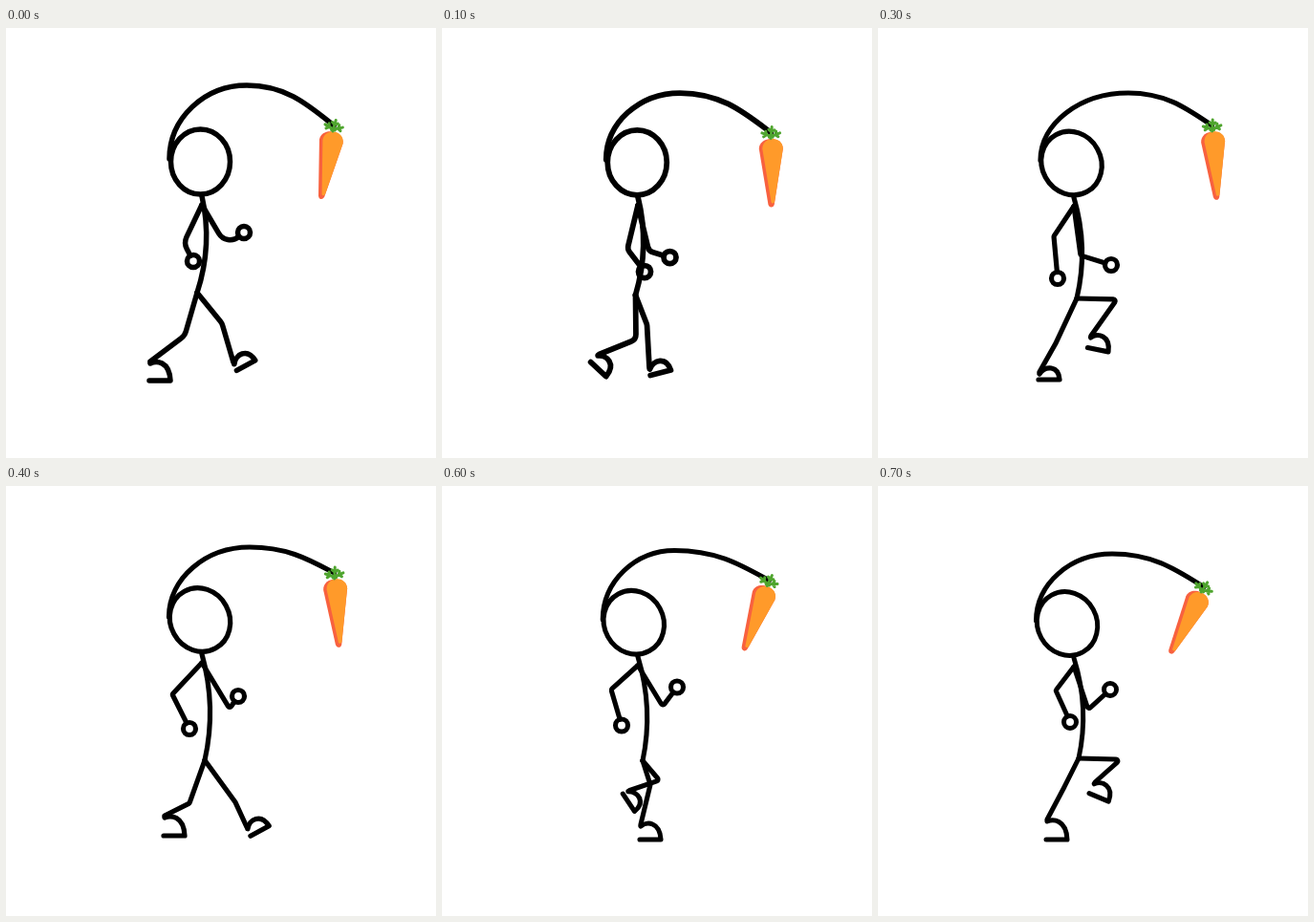
Recreate the animation shown at these times as an HTML page with a canvas. Size 450 px wide and 450 px high, loop 0.8 s.

```html
<!DOCTYPE html>
<html lang="en">
<head>
<meta charset="utf-8">
<title>Carrot walk</title>
<style>
html, body { margin: 0; width: 100%; height: 100%; overflow: hidden; background: #fff; }
canvas { display: block; width: 450px; height: 450px; }
</style>
</head>
<body>
<canvas id="stage" width="450" height="450"></canvas>
<script>
const ctx = document.getElementById('stage').getContext('2d');
const STEP = 100, STEPS = 8, HAND = 6.5;

// Key poses. Arms: elbow, hand. Legs: knee, ankle, [foot angle, foot depth].
const keys = [
  { at: 0, pen: 5.5, soft: 14, head: [203.5, 140], tilt: 0, hip: [200, 277],
    apex: [252, 60], carrot: [342, 109], swing: 0.175,
    arms: [[[186, 225], [196, 244]], [[231, 229], [249, 214]]],
    legs: [[[187, 322], [151, 349], [0, 20]], [[226, 309], [238, 350], [-0.5, 9]]] },
  { at: 2, pen: 6, soft: 2, head: [205, 141.5], tilt: 0, hip: [205, 282],
    apex: [246, 76], carrot: [346.5, 124], swing: -0.185,
    arms: [[[202, 238], [228, 266]], [[202, 238], [228, 266]]],
    legs: [[[219, 330], [178, 334], [1.5, 4]], [[203, 312], [196, 360], [0, 8]]] },
  { at: 3, pen: 5.2, soft: 2, head: [202.5, 141.5], tilt: -0.5, hip: [208, 283],
    apex: [262, 68], carrot: [350, 109], swing: -0.06,
    arms: [[[184, 218], [188, 262]], [[212, 238], [244, 248]]],
    legs: [[[250, 284], [223, 322], [0.2, 13]], [[186, 330], [169, 360], [0, 8]]] },
  { at: 4, pen: 5.2, soft: 2, head: [203, 140], tilt: -0.5, hip: [208, 287],
    apex: [255, 64], carrot: [344, 98], swing: -0.06,
    arms: [[[174, 218], [192, 254]], [[234, 233], [243, 220]]],
    legs: [[[240, 331], [252, 357], [-0.5, 10]], [[192, 332], [166, 345], [0, 21]]] },
  { at: 5, pen: 5.2, soft: 2, head: [203.5, 141.5], tilt: -0.5, hip: [210, 290],
    apex: [242, 64], carrot: [342, 99], swing: 0.23,
    arms: [[[168, 212], [175, 254]], [[242, 227], [249, 208]]],
    legs: [[[241, 310], [239, 359], [0, 11]], [[201, 330], [166, 327], [1.57, 3]]] },
  { at: 7, pen: 5, soft: 2, head: [198, 144], tilt: -0.5, hip: [210, 285],
    apex: [245, 71], carrot: [338, 112], swing: 0.47,
    arms: [[[186, 214], [201, 247]], [[220, 234], [243, 213]]],
    legs: [[[195, 315], [177, 349], [0, 21]], [[254, 286], [227, 310], [0.4, 13]]] }
];

function mix(a, b, t) {
  if (typeof a === 'number') return a + (b - a) * t;
  if (Array.isArray(a)) return a.map((v, i) => mix(v, b[i], t));
  return Object.fromEntries(Object.keys(a).map(k => [k, mix(a[k], b[k], t)]));
}

function poseAt(step) {
  const next = keys.findIndex(k => k.at >= step);
  const b = keys[next], a = keys[Math.max(0, next - 1)];
  return mix(a, b, a === b ? 0 : (step - a.at) / (b.at - a.at));
}

function stroke(build) {
  ctx.beginPath();
  build();
  ctx.stroke();
}

function within([x, y], angle, draw) {
  ctx.save();
  ctx.translate(x, y);
  ctx.rotate(angle);
  draw();
  ctx.restore();
}

function limb(from, joint, end, soft) {
  stroke(() => {
    ctx.moveTo(...from);
    ctx.arcTo(...joint, ...end, soft);
    ctx.lineTo(...end);
  });
}

function arm(shoulder, [elbow, hand], soft) {
  const reach = Math.hypot(hand[0] - elbow[0], hand[1] - elbow[1]);
  limb(shoulder, elbow, mix(hand, elbow, HAND / reach), soft);
  stroke(() => ctx.arc(...hand, HAND, 0, Math.PI * 2));
}

function leg(hip, [knee, ankle, [angle, depth]], soft) {
  limb(hip, knee, ankle, soft);
  within(ankle, angle, () => stroke(() => {
    ctx.moveTo(0, 2);
    ctx.bezierCurveTo(6, depth / 2 - 11, 20, depth / 2 - 11, 21, depth);
    ctx.lineTo(-1, depth);
  }));
}

// A quarter arc up to the apex, then a slope down to the end.
function rope([x, y], [ax, ay], [ex, ey]) {
  const k = 0.55, dx = ex - ax, dy = ey - ay;
  stroke(() => {
    ctx.moveTo(x, y);
    ctx.bezierCurveTo(x, y + (ay - y) * k, ax + (x - ax) * k, ay, ax, ay);
    ctx.bezierCurveTo(ax + dx * 0.45, ay, ex - dx * 0.3, ey - dy * 0.52, ex, ey);
  });
}

function carrot(at, swing) {
  within(at, swing, () => {
    ctx.fillStyle = '#f8613f';
    ctx.fill(new Path2D('M-12.5 10C-12.5-4 12.5-4 12.5 10L3.2 68Q2.5 71 0 71T-3.2 68Z'));
    ctx.fillStyle = '#ff9a2a';
    ctx.fill(new Path2D('M-9 10C-9-4 12.5-4 12.5 10L3.4 66Q1 68 0 66Z'));
    ctx.strokeStyle = '#4fa52e';
    ctx.lineWidth = 3;
    for (const turn of [-1.2, 0.1, 1.2]) {
      within([0, -3], turn, () => stroke(() => {
        ctx.moveTo(0, 2);
        ctx.lineTo(0, -10);
        ctx.moveTo(-3, -7);
        ctx.lineTo(0, -5);
        ctx.lineTo(3, -7);
      }));
    }
  });
}

function drawPose(p) {
  const [hx, hy] = p.head, [bx, by] = p.hip;
  const neck = [205, hy + 36], shoulder = [205, hy + 45];
  ctx.strokeStyle = '#000';
  ctx.lineWidth = p.pen;

  const [cx, cy] = p.carrot;
  rope([hx - 32.5, hy - 3], p.apex, [cx + 7 * Math.sin(p.swing), cy - 7 * Math.cos(p.swing)]);
  stroke(() => ctx.ellipse(hx, hy, 31, 34, p.tilt, 0, Math.PI * 2));
  stroke(() => {
    ctx.moveTo(...neck);
    ctx.quadraticCurveTo((neck[0] + bx) / 2 + 14, (neck[1] + by) / 2, bx, by);
  });
  for (const a of p.arms) arm(shoulder, a, p.soft);
  for (const l of p.legs) leg(p.hip, l, p.soft);
  carrot(p.carrot, p.swing);
}

function draw() {
  const step = Math.floor(performance.now() / STEP) % STEPS;
  ctx.fillStyle = '#fff';
  ctx.fillRect(0, 0, 450, 450);
  ctx.lineCap = ctx.lineJoin = 'round';
  drawPose(poseAt(step));
  requestAnimationFrame(draw);
}
draw();
</script>
</body>
</html>
```
